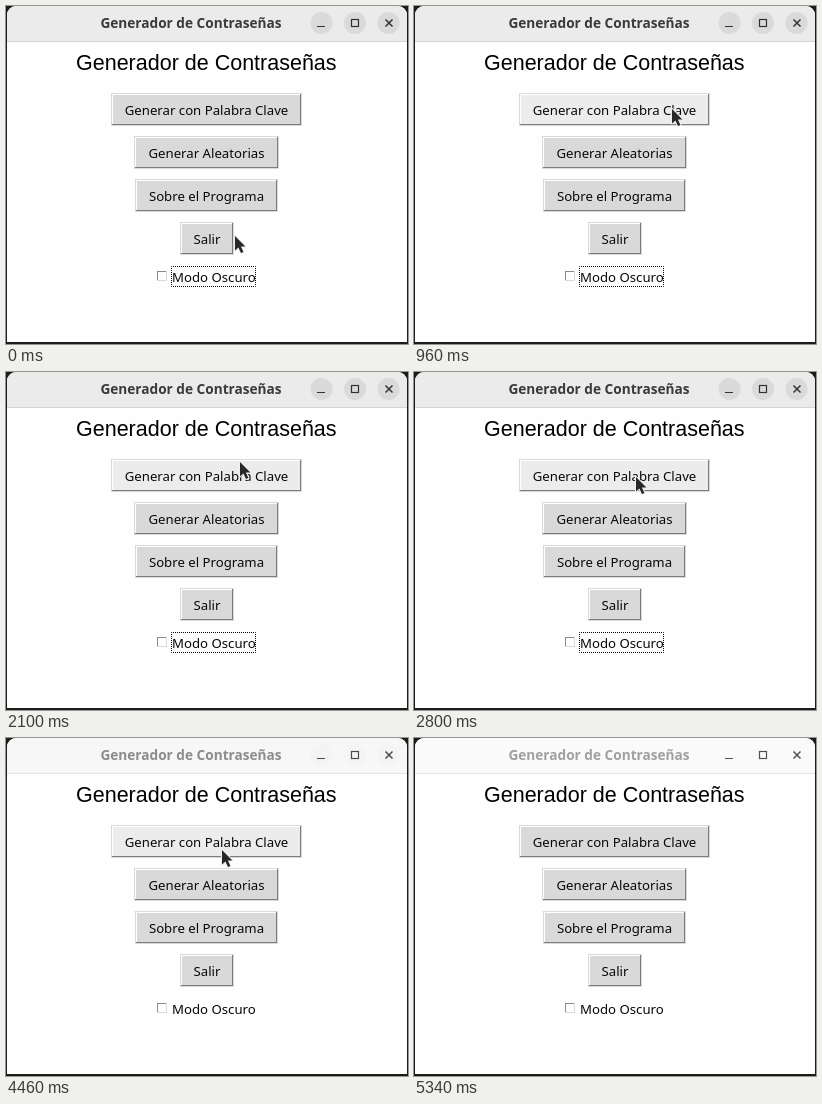
Write an HTML page with a canvas that moves like this. It is 402 by 338 pixels and loops after 8000 ms.

```html
<!DOCTYPE html>
<html lang="es">
<head>
<meta charset="utf-8">
<title>Generador de Contraseñas</title>
<style>
html, body { margin: 0; width: 100%; height: 100%; overflow: hidden; background: #fefefe; }
canvas { display: block; width: 402px; height: 338px; }
</style>
</head>
<body>
<canvas id="stage" width="402" height="338"></canvas>
<script>
const ctx = document.getElementById('stage').getContext('2d');
const LOOP = 8000;
const TITLE = 'Generador de Contraseñas';
const UI_FONT = '13.2px "Noto Sans", sans-serif';
const PAGE = '#fefefe', INK = '#080808';

// Pointer moves: each starts where the previous one ended
const HOME = { x: 229, y: 230 };
const MOVES = [
  { from: 80, to: 560, x: 276, y: 130 },
  { from: 560, to: 840, x: 260, y: 104 },
  { from: 900, to: 1400, x: 241, y: 92 },
  { from: 1480, to: 2100, x: 234, y: 90 },
  { from: 2300, to: 2960, x: 218, y: 110 },
  { from: 4060, to: 4460, x: 216, y: 112 },
  { from: 4820, to: 5320, x: 44, y: 124 }
];
const PRESS = 3760, RELEASE = 4060, BLUR = 4300, FADE = 200, GONE = 5340;

const BTN_H = 33, BTN_STEP = 43;
const BUTTONS = [
  ['Generar con Palabra Clave', 191],
  ['Generar Aleatorias', 145],
  ['Sobre el Programa', 143],
  ['Salir', 54]
].map(([label, w], i) => ({ label, w, x: Math.floor(201 - w / 2), y: 87 + i * BTN_STEP }));

const ARROW = new Path2D('M0 0V14.5L3.4 11.4L6 17L8.4 16L5.9 10.6L10.4 10.4Z');

function rect(x, y, w, h, color) {
  ctx.fillStyle = color;
  ctx.fillRect(x, y, w, h);
}

function roundTop(y, h, color) {
  ctx.fillStyle = color;
  ctx.beginPath();
  ctx.roundRect(1, y, 400, h, [9, 9, 0, 0]);
  ctx.fill();
}

function text(str, x, y, font, color, align = 'center') {
  ctx.font = font;
  ctx.fillStyle = color;
  ctx.textAlign = align;
  ctx.fillText(str, x, y);
}

function gray(a, b, k) {
  const v = Math.round(a + (b - a) * k);
  return `rgb(${v}, ${v}, ${v})`;
}

function pointerAt(t) {
  let { x, y } = HOME;
  for (const m of MOVES) {
    const k = Math.max(0, Math.min(1, (t - m.from) / (m.to - m.from)));
    x += (m.x - x) * k;
    y += (m.y - y) * k;
  }
  return { x: Math.round(x), y: Math.round(y) };
}

function drawTitleBar(k) {
  roundTop(0, 35, gray(235, 250, k));
  rect(1, 35, 400, 1, gray(212, 228, k));
  text(TITLE, 185, 22, 'bold 13.65px "Open Sans", sans-serif', gray(58, 160, k));

  for (const x of [315.5, 349, 382.5]) {
    ctx.fillStyle = gray(218, 250, k);
    ctx.beginPath();
    ctx.arc(x, 17, 11, 0, Math.PI * 2);
    ctx.fill();
  }
  const icon = gray(50, 80, k);
  rect(311, 20, 8, 1, icon);
  ctx.strokeStyle = icon;
  ctx.lineWidth = 1.2;
  ctx.strokeRect(345.5, 13.5, 7, 7);
  ctx.beginPath();
  ctx.moveTo(379.5, 13.5);
  ctx.lineTo(386.5, 20.5);
  ctx.moveTo(386.5, 13.5);
  ctx.lineTo(379.5, 20.5);
  ctx.lineWidth = 1.5;
  ctx.stroke();
}

function drawButton({ label, x, y, w }, hover, pressed) {
  const light = '#ffffff', dark = '#7c7c7c';
  const d = pressed ? 2 : 0;
  rect(x, y, w, BTN_H, '#d9d9d9');
  rect(x + 1, y + 1, w - 2, BTN_H - 2, pressed ? light : dark);
  rect(x + 1, y + 1, w - 3, BTN_H - 3, pressed ? dark : light);
  rect(x + 2, y + 2, w - 4, BTN_H - 4, hover ? '#ececec' : '#d9d9d9');
  text(label, x + w / 2 + d, y + 22 + d, UI_FONT, INK);
}

function drawCheck(focused) {
  rect(151, 265, 10, 10, '#d9d9d9');
  rect(151, 265, 9, 9, '#8c8c8c');
  rect(152, 266, 8, 8, PAGE);
  text('Modo Oscuro', 166, 276, UI_FONT, INK, 'left');
  if (!focused) return;
  ctx.strokeStyle = '#000';
  ctx.lineWidth = 1;
  ctx.setLineDash([1, 1]);
  ctx.lineDashOffset = 0.5;
  ctx.strokeRect(165.5, 260.5, 84, 20);
  ctx.setLineDash([]);
}

function drawPointer({ x, y }) {
  ctx.save();
  ctx.translate(x, y);
  ctx.lineJoin = 'round';
  ctx.lineWidth = 2;
  ctx.strokeStyle = '#f0f0f0';
  ctx.stroke(ARROW);
  ctx.fillStyle = '#282828';
  ctx.fill(ARROW);
  ctx.restore();
}

function draw(t) {
  const p = pointerAt(t);
  const shown = t < GONE;
  const pressed = t >= PRESS && t < RELEASE;
  const fade = Math.max(0, Math.min(1, (t - BLUR) / FADE));

  rect(0, 0, 402, 338, '#1c1c1c');
  roundTop(0, 336, PAGE);
  drawTitleBar(fade);
  text(TITLE, 200.3, 64, '21.5px "Liberation Sans", Arial, sans-serif', '#000');
  BUTTONS.forEach((b, i) => {
    const hover = shown && p.x >= b.x && p.x < b.x + b.w && p.y >= b.y && p.y < b.y + BTN_H;
    drawButton(b, hover, pressed && i === 0);
  });
  drawCheck(t < BLUR);
  if (shown) drawPointer(p);
}

const start = performance.now();
function tick() {
  draw((performance.now() - start) % LOOP);
  requestAnimationFrame(tick);
}
tick();
</script>
</body>
</html>
```
